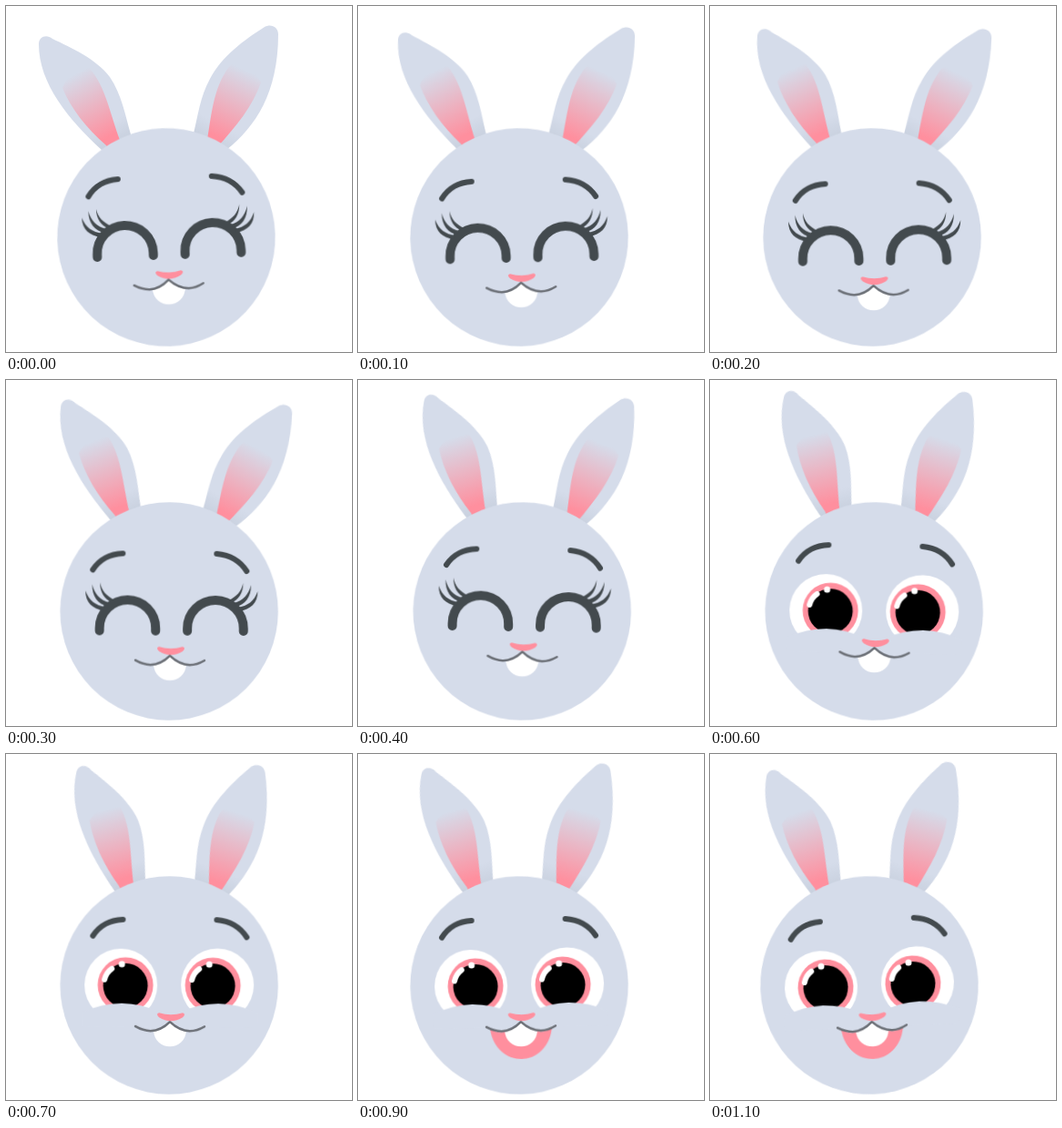
Animation of 380x380 px, one loop 1.2 s. Source, as an HTML page without scripts:

```html
<!DOCTYPE html>
<html lang="en">
<head>
<meta charset="utf-8">
<title>Bunny</title>
<style>
html, body { margin: 0; width: 100%; height: 100%; overflow: hidden; background: #fff; }
svg { display: block; width: 100vw; height: 100vh; }

.fur { fill: #d5dcea; }
.pink { fill: #ff8f9e; }
.white { fill: #fff; }
.ink { fill: #434a4e; }
.line { fill: none; stroke: #434a4e; stroke-linecap: round; }

/* The picture moves in 100 ms holds, twelve to a loop */
.ear-l, .ear-r, .head, .face, .shut, .open, .laugh { animation: 1.2s infinite; }
.ear-l { transform-origin: 124px 146px; animation-name: ear-l; }
.ear-r { transform-origin: 222px 148px; animation-name: ear-r; }
.head { transform-origin: 179px 254px; animation-name: head; }
.face { animation-name: nod; }
.shut { animation-name: shut; }
.open { animation-name: open; }
.laugh { animation-name: laugh; }
.shut, .open, .laugh { animation-timing-function: step-end; }

@keyframes ear-l {
  0% { transform: translate(0, 0) rotate(0deg); animation-timing-function: steps(3); }
  25% { transform: translate(10.5px, -2.5px) rotate(7.2deg); animation-timing-function: steps(2); }
  41.66% { transform: translate(20px, -5.5px) rotate(14.6deg); animation-timing-function: steps(6); }
  91.66%, 100% { transform: translate(6px, -3px) rotate(10.3deg); }
}
@keyframes ear-r {
  0% { transform: translate(0, 0) rotate(0deg); animation-timing-function: steps(3); }
  25% { transform: translate(10px, 2.5px) rotate(2.6deg); animation-timing-function: steps(2); }
  41.66% { transform: translate(7px, -.5px) rotate(-6.7deg); animation-timing-function: steps(6); }
  91.66%, 100% { transform: translate(-8px, -3px) rotate(-9.8deg); }
}
@keyframes head {
  0% { transform: translateX(-3px) rotate(-1.9deg); animation-timing-function: steps(5); }
  41.66% { transform: translateX(2.3px) rotate(1.6deg); animation-timing-function: steps(6); }
  91.66%, 100% { transform: translateX(-4px) rotate(-2.5deg); }
}
@keyframes nod {
  0% { transform: translateY(6.5px); animation-timing-function: steps(2); }
  16.66% { transform: translateY(13px); animation-timing-function: steps(3); }
  41.66%, 100% { transform: translateY(0); }
}
@keyframes shut { 0% { visibility: visible; } 49.99%, 100% { visibility: hidden; } }
@keyframes open { 0% { visibility: hidden; } 49.99%, 100% { visibility: visible; } }
@keyframes laugh { 0% { visibility: hidden; } 66.66%, 100% { visibility: visible; } }
</style>
</head>
<body>
<svg viewBox="0 0 380 380">
  <defs>
    <linearGradient id="fur-l" gradientUnits="userSpaceOnUse" x1="110" y1="130" x2="122" y2="152">
      <stop stop-color="#d5dcea"/><stop offset="1" stop-color="#c8d0de"/>
    </linearGradient>
    <linearGradient id="fur-r" gradientUnits="userSpaceOnUse" x1="233" y1="129" x2="221" y2="151">
      <stop stop-color="#d5dcea"/><stop offset="1" stop-color="#c8d0de"/>
    </linearGradient>
    <linearGradient id="in-l" gradientUnits="userSpaceOnUse" x1="74" y1="76" x2="111" y2="145">
      <stop stop-color="#d5dcea"/><stop offset="1" stop-color="#ff8f9e"/>
    </linearGradient>
    <linearGradient id="in-r" gradientUnits="userSpaceOnUse" x1="264" y1="71" x2="231" y2="143">
      <stop stop-color="#d5dcea"/><stop offset="1" stop-color="#ff8f9e"/>
    </linearGradient>
    <g id="iris">
      <circle class="pink" r="30.5"/>
      <circle r="24.5" cy=".5"/>
      <path d="M-23 -6Q-21 -14 -15 -18" fill="none" stroke="#fff" stroke-width="6" stroke-linecap="round"/>
      <circle class="white" cx="-4" cy="-23" r="3.5"/>
    </g>
    <g id="lid">
      <path class="line" stroke-width="10" d="M102.6 267V264A30.8 31 0 0 1 164.2 264V267"/>
      <path class="ink" d="M87 223C87 236 95 243 107 245L109 241C98 239 91 234 87 223ZM94.5 216C94 229 101 238 111 240L113 236C103 233 97 227 94.5 216ZM103 214C103 225 108 232 116 236L119 233C110 229 105 223 103 214Z"/>
    </g>
  </defs>

  <g class="ear-l">
    <path fill="url(#fur-l)" d="M36 42C36 33 45 31 51 36C72 46 99 58 114 78C127 97 131 120 137 141L150 180L125 175L105 158C69 125 36 85 36 42Z"/>
    <path fill="url(#in-l)" d="M62 90Q70 70 88 65C108 82 114 118 125 147L118 165L110 153C88 134 71 112 62 90Z"/>
  </g>
  <g class="ear-r">
    <path fill="url(#fur-r)" d="M299 31C299 23 291 19 284 23C262 37 237 55 224 80C213 100 211 120 206 140L195 180H225L242 158C274 133 299 95 299 31Z"/>
    <path fill="url(#in-r)" d="M249 62Q270 64 280 84C271 110 253 132 232 155L222 160L221 147C226 118 228 85 249 62Z"/>
  </g>

  <g class="head">
    <circle class="fur" cx="179" cy="254" r="119.7"/>
    <g class="face">
      <g class="shut">
        <use href="#lid"/>
        <use href="#lid" transform="translate(363.3) scale(-1 1)"/>
      </g>
      <g class="open">
        <circle class="white" cx="126" cy="254" r="40"/>
        <circle class="white" cx="232" cy="253.5" r="40"/>
        <use href="#iris" x="131" y="254"/>
        <use href="#iris" x="227" y="254"/>
        <path class="fur" d="M84 284Q127 264 170 284V300H84ZM190 284Q233 264 276 284V300H190Z"/>
      </g>
      <path class="line" stroke-width="6" d="M95 200Q106 183 128 182M231 182Q253 184 264 201"/>
      <g transform="translate(0 -.8)">
        <path class="laugh pink" d="M146 302C152 347 208 347 214 302Q198 313 180 295Q163 313 146 302Z"/>
        <path class="white" d="M162 304C163 328 197 328 198 304Q188 303 180 295Q172 303 162 304Z"/>
        <path class="line" style="stroke:#6c7077" stroke-width="2.5" d="M142 300Q163 312 180 295Q198 312 218 300"/>
        <path class="pink" d="M168 285Q181 289 194 285Q198 286 194 290Q181 298 168 290Q164 286 168 285Z"/>
      </g>
    </g>
  </g>
</svg>
</body>
</html>
```
